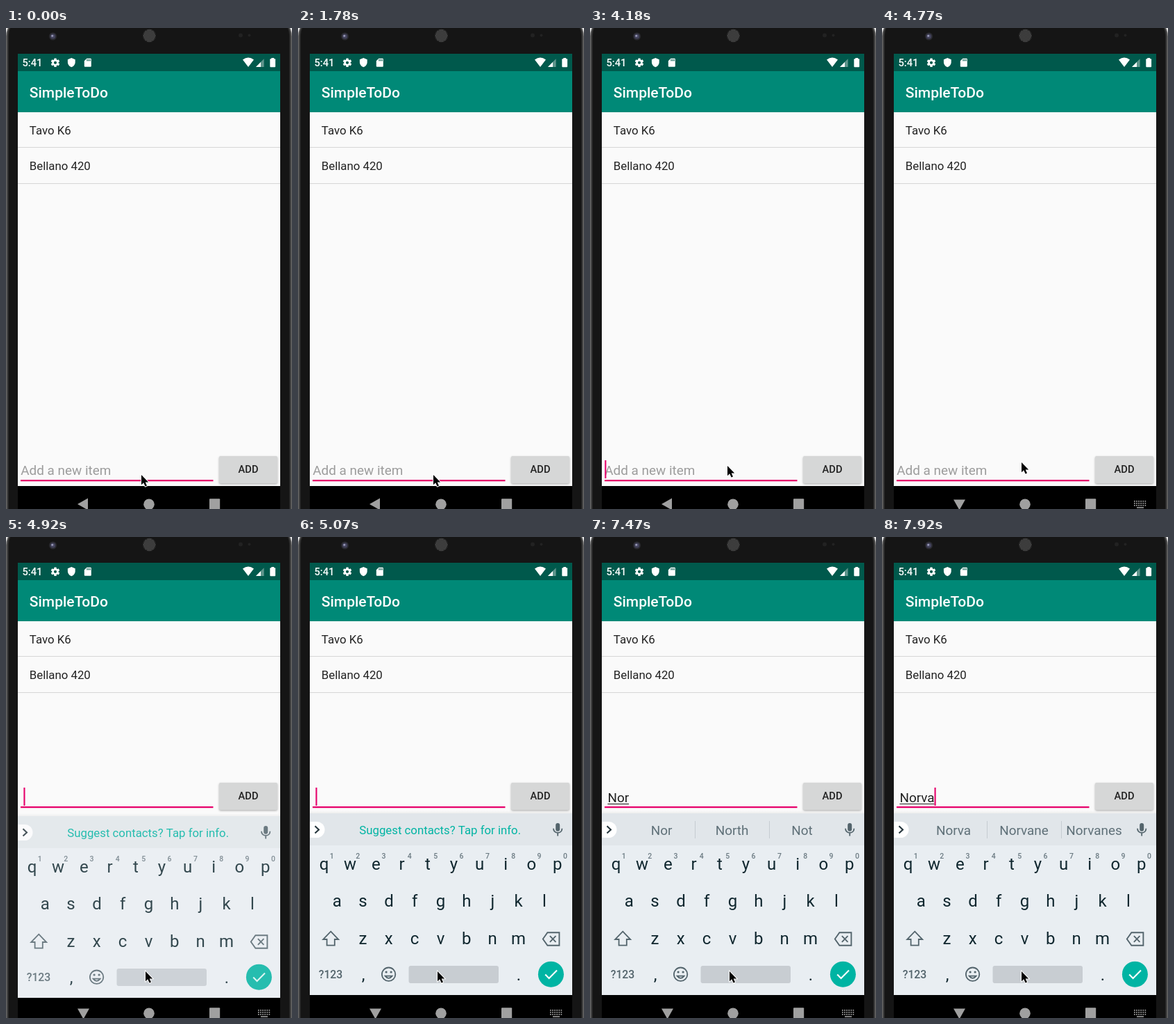
Animation, 412 px wide and 691 px high, one loop 8000 ms. Source, as an HTML page with a canvas:

```html
<!DOCTYPE html>
<html lang="en">
<head>
<meta charset="utf-8">
<title>SimpleToDo</title>
<style>
html, body { margin: 0; width: 100%; height: 100%; overflow: hidden; background: #000; }
canvas { display: block; width: 412px; height: 691px; }
</style>
</head>
<body>
<canvas id="stage"></canvas>
<script>
const W = 412, H = 691, LOOP = 8000;
const canvas = document.getElementById('stage');
const ctx = canvas.getContext('2d');
const dpr = window.devicePixelRatio || 1;
canvas.width = W * dpr;
canvas.height = H * dpr;

const PINK = '#e6006a', TEAL = '#00b4a3', INK = '#10272f', SLATE = '#53646c';
const caretFlips = [290, 740, 1190, 1780, 2230, 2680, 3280, 3730, 4180, 4630,
  4920, 5520, 5970, 7470, 7620];
const typing = [[0, ''], [6120, 'N'], [6420, 'No'], [7020, 'Nor'], [7620, 'Norv'], [7920, 'Norva']];
const hints = [[0, null], [7020, ['Nor', 'North', 'Not']],
  [7620, ['Norv', 'Norvane', 'Norms']], [7920, ['Norva', 'Norvane', 'Norvanes']]];
const pointer = [[0, [195, 642]], [4180, [198, 629]], [4330, [201, 624]]];
const NAV_AT = 4770, KEYS_AT = 4920, SETTLE_AT = 5070;

// Last value whose start time has passed
const at = (steps, t) => steps.reduce((v, s) => t >= s[0] ? s[1] : v, steps[0][1]);

function rect(x, y, w, h, color, r = 0) {
  ctx.fillStyle = color;
  ctx.beginPath();
  ctx.roundRect(x, y, w, h, r);
  ctx.fill();
}

function disc(x, y, r, color) {
  ctx.fillStyle = color;
  ctx.beginPath();
  ctx.arc(x, y, r, 0, 7);
  ctx.fill();
}

function shape(d, color, x = 0, y = 0) {
  ctx.save();
  ctx.translate(x, y);
  ctx.fillStyle = color;
  ctx.fill(new Path2D(d));
  ctx.restore();
}

function line(d, color, width, x = 0, y = 0) {
  ctx.save();
  ctx.translate(x, y);
  ctx.strokeStyle = color;
  ctx.lineWidth = width;
  ctx.stroke(new Path2D(d));
  ctx.restore();
}

function text(s, x, y, size, color, align = 'left', weight = 400) {
  ctx.font = `${weight} ${size}px Roboto, sans-serif`;
  ctx.textAlign = align;
  ctx.fillStyle = color;
  ctx.fillText(s, x, y);
}

function phone() {
  rect(0, 0, W, H, '#e4e4e4');
  rect(0, -14, W, H + 60, '#5c5c5c', 26);
  rect(2, -14, W - 4, H + 60, '#2c2c2c', 25);
  rect(4, -14, W - 8, H + 60, '#151515', 24);
  disc(67.5, 12, 5.5, '#2b2b31');
  disc(67.5, 12, 3.6, '#43435c');
  disc(66.8, 11.2, 1.5, '#9a9ab8');
  disc(206.5, 11, 9.5, '#2c2c2c');
  for (let j = -4; j <= 4; j++)
    for (let i = -4; i <= 4; i++) {
      const x = i * 2 + (j & 1), y = j * 2;
      if (x * x + y * y < 76) disc(206.5 + x, 11 + y, 0.6, '#777');
    }
  disc(338, 10.5, 3, '#222');
  disc(350.5, 10.5, 2, '#222');
}

function gear(x, y) {
  ctx.save();
  ctx.translate(x, y);
  for (let i = 0; i < 6; i++) {
    rect(-1.7, -6.3, 3.4, 4, '#fff', 0.6);
    ctx.rotate(Math.PI / 3);
  }
  disc(0, 0, 4.7, '#fff');
  disc(0, 0, 2.1, '#00594c');
  ctx.restore();
}

function statusBar() {
  rect(17, 37, 378, 25, '#00594c');
  text('5:41', 23.5, 55, 14.7, '#fff', 'left', 500);
  gear(71, 49.8);
  shape('M0-6.5 5.4-4.2V-.5C5.4 3 3 5.8 0 6.7-3 5.8-5.4 3-5.4-.5V-4.2Z', '#fff', 94.3, 49.5);
  shape('M-1.4-6H4Q5-6 5-5V5Q5 6 4 6H-4Q-5 6-5 5V-2.4Z', '#fff', 117.8, 49.7);
  for (let i = 0; i < 3; i++) rect(116.4 + i * 2.1, 45, 1.1, 2.6, '#00594c');
  shape('M0 7-8-3.4Q0-9.4 8-3.4Z', '#fff', 349, 49);
  shape('M360 56H371.6V44.2Z', '#5f958c');
  shape('M360 56H367V48.9Z', '#fff');
  rect(382.3, 43, 3.8, 2.5, '#fff');
  rect(380.3, 44.3, 7.8, 11.9, '#fff', 1);
}

function list() {
  rect(17, 62, 378, 59, '#008977');
  text('SimpleToDo', 33.8, 99.5, 21, '#fff', 'left', 500);
  ['Tavo K6', 'Bellano 420'].forEach((name, i) => {
    const y = 121 + i * 51.4;
    text(name, 33.8, y + 31.7, 16.8, '#222');
    rect(17, Math.round(y + 50.4), 378, 1, '#d6d6d6');
  });
}

function inputRow(t) {
  const open = t >= KEYS_AT;
  const dy = open ? -262 : 0, base = open ? 381 : 642;
  const left = open ? 25.4 : 21.3;
  const typed = at(typing, t);
  const caretOn = caretFlips.filter(f => t >= f).length % 2;

  if (!open) text('Add a new item', left, base, 18.9, '#9c9c9c');
  text(typed, left, base, 18.9, '#222');
  const width = ctx.measureText(typed).width;
  if (typed) rect(left, base + 2, width, 1.1, '#222');
  rect(21, 649 + dy, 277.5, 2.2, PINK);
  if (caretOn) rect(left + width, base - 21, 2.1, 26, PINK);

  ctx.save();
  ctx.shadowColor = 'rgba(0,0,0,.3)';
  ctx.shadowBlur = 3 * dpr;
  ctx.shadowOffsetY = 1.2 * dpr;
  rect(307, 615 + dy, 84, 39, '#d6d7d7', 2);
  ctx.restore();
  text('ADD', 349, 639.2 + dy, 14.7, '#222', 'center', 500);
}

function navBar(t) {
  rect(17, 658, 378, 33, '#000');
  const gray = '#a0a0a0';
  if (t < NAV_AT) shape('M103 684 118 675.5V692.5Z', gray);
  else {
    shape('M103 677.5H120L111.5 692.5Z', gray);
    for (let j = 0; j < 3; j++)
      for (let i = 0; i < 6; i++) rect(363 + i * 3.1, 679 + j * 3, 1.7, 1.7, gray);
    rect(367, 688.2, 10, 1.6, gray);
  }
  disc(206, 684.3, 7.8, gray);
  rect(293, 676.3, 15.2, 16, gray, 1);
}

function suggestionBar(words) {
  rect(17, 397, 378, 46, '#e1e6ea');
  rect(4, 409, 34.5, 23, '#fff', 11.5);
  line('M24.5 415.2 30 420.4 24.5 425.6', '#26363d', 2.1);
  if (words) {
    words.forEach((w, i) => text(w, [103, 204.5, 305.5][i], 427.5, 18.9, '#5f7078', 'center'));
    rect(151, 408, 1, 25, '#c5ccd1');
    rect(258, 408, 1, 25, '#c5ccd1');
  } else text('Suggest contacts? Tap for info.', 204.7, 426.5, 16.8, TEAL, 'center');
  rect(371.2, 411, 6, 11.8, SLATE, 3);
  line('M-6.2-1.2C-6.2 7 6.2 7 6.2-1.2M0 5V9.6', SLATE, 1.8, 374.2, 420);
}

function keyRow(keys, x, y) {
  [...keys].forEach((k, i) => text(k, x + i * 37.35, y, 24, INK, 'center'));
}

function keyboard(words) {
  rect(17, 443, 378, 215, '#e9eef2');
  suggestionBar(words);
  keyRow('qwertyuiop', 37.6, 478);
  [...'1234567890'].forEach((n, i) =>
    text(n, 48.8 + i * 37.35, 461.5, 10.5, '#6b7a82', 'center', 500));
  keyRow('asdfghjkl', 56.2, 531);
  keyRow('zxcvbnm', 93.4, 584.5);

  line('M0-10.3 11 1H5.6V9.6H-5.6V1H-11Z', SLATE, 1.8, 47.2, 577);
  line('M-12 0-5.5-9H12V9H-5.5ZM-2.6-4.3 6-4.3M-2.6-4.3', 'rgba(0,0,0,0)', 1, 364, 577.5);
  line('M-11.6 0-5-9.2H12V9.2H-5ZM-1.5-4.3 7 4.3M7-4.3-1.5 4.3', SLATE, 1.9, 364.4, 577.5);

  text('?123', 47, 634, 15.8, SLATE, 'center', 500);
  text(',', 94, 637, 24, INK, 'center');
  text('.', 317.8, 637, 24, INK, 'center');
  line('M9.7 0A9.7 9.7 0 1 1-9.7 0 9.7 9.7 0 1 1 9.7 0M-5 2.4Q0 9 5 2.4Z', SLATE, 1.8, 130.6, 628.2);
  disc(127.1, 625, 1.6, SLATE);
  disc(134.1, 625, 1.6, SLATE);
  rect(159.5, 616, 129.5, 25, '#c8cdd2', 3);
  disc(364.4, 628.2, 18.5, TEAL);
  line('M-8.2.4-2.8 5.8 8.6-5.6', '#fff', 2.1, 364.4, 628.2);
}

function keyboardLayer(t) {
  const settling = t < SETTLE_AT;
  ctx.save();
  if (settling) {
    rect(17, 658, 378, 4, '#fafafa');
    ctx.translate(0, 4);
    ctx.globalAlpha = 0.84;
  }
  const shade = ctx.createLinearGradient(0, 393, 0, 397);
  shade.addColorStop(0, 'rgba(0,0,0,0)');
  shade.addColorStop(1, 'rgba(0,0,0,.05)');
  rect(17, 393, 378, 4, shade);
  ctx.beginPath();
  ctx.rect(17, 397, 378, 261);
  ctx.clip();
  keyboard(at(hints, t));
  ctx.restore();
}

function arrow([x, y]) {
  const d = 'M0 0V14.2L3.2 11.3 5.6 16.6 8 15.6 5.7 10.4H10.2Z';
  line(d, '#fff', 1.8, x, y);
  shape(d, '#000', x, y);
}

function draw() {
  const t = performance.now() % LOOP;
  ctx.setTransform(dpr, 0, 0, dpr, 0, 0);
  phone();
  rect(17, 121, 378, 537, '#fafafa');
  statusBar();
  list();
  inputRow(t);
  navBar(t);
  if (t >= KEYS_AT) keyboardLayer(t);
  arrow(at(pointer, t));
  requestAnimationFrame(draw);
}
requestAnimationFrame(draw);
</script>
</body>
</html>
```
